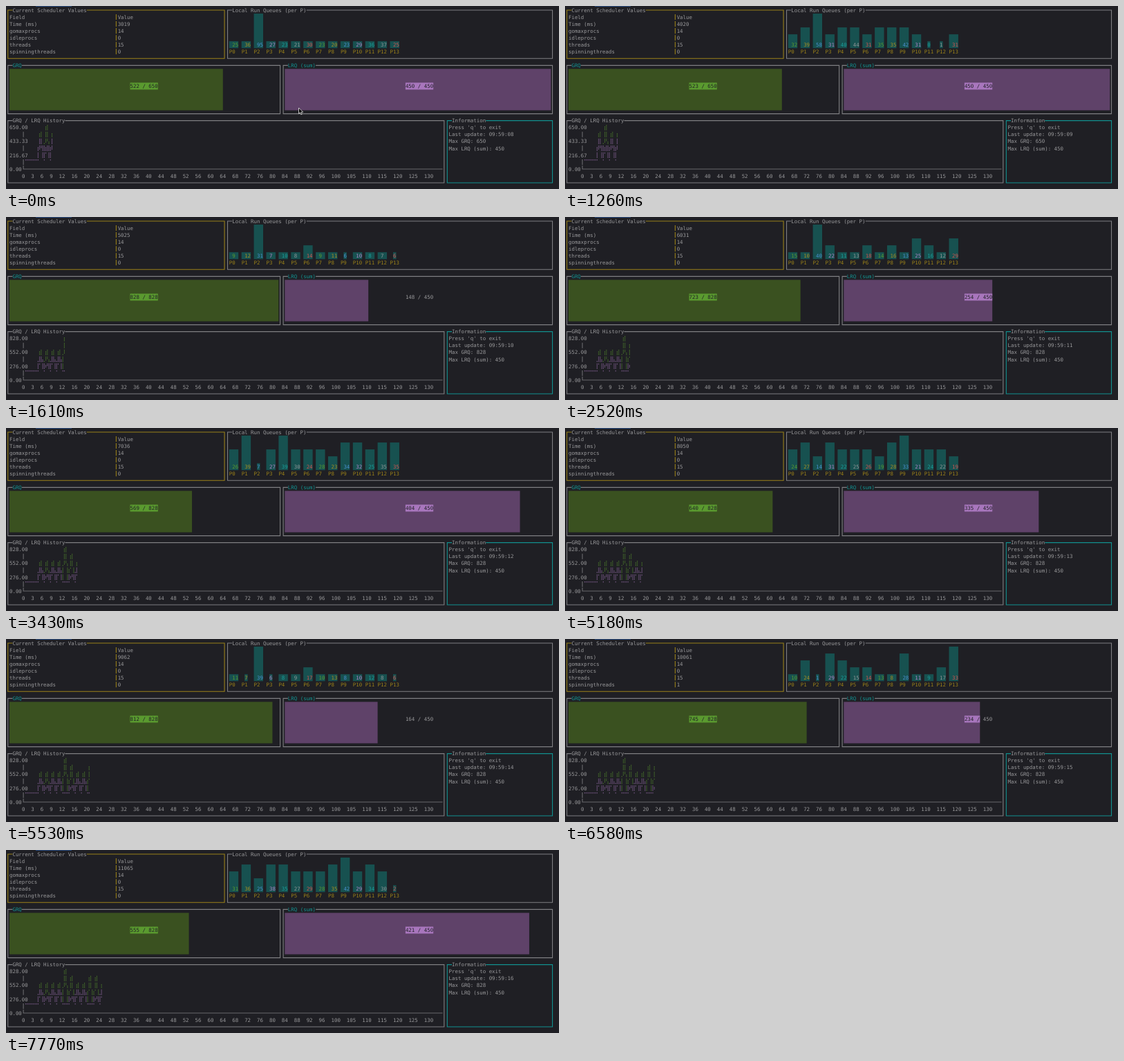
Recreate the animation shown at these times as an HTML page. Size 800 by 266 pixels, loop 8000 ms.

```html
<!DOCTYPE html>
<html lang="en">
<head>
<meta charset="utf-8">
<title>Scheduler monitor</title>
<style>
  html, body { margin: 0; width: 100%; height: 100%; overflow: hidden; background: #1f1f24; }
  svg { display: block; }
  text { font: 7.43px "DejaVu Sans Mono", monospace; white-space: pre; text-rendering: geometricPrecision; }
</style>
</head>
<body>
<svg id="screen" width="800" height="266" viewBox="0 0 800 266"></svg>
<script>
const LOOP = 8000, CW = 4.476, RH = 10.04;
const GREY = '#98989a', LINE = '#7f7f82', YELLOW = '#9a8119', CYAN = '#12918f';
const GREEN = '#5a9a2f', PURPLE = '#a876bd', TEAL = '#175150', DARK = '#1f1f24';
const CYCLE = [GREEN, '#a78f22', '#4b90cf', '#b184c8', '#1b9f9b', '#919698', '#d25450'];

// Terminal grid: left edge of a column, top and centre of a row
const colX = c => 0.5 + c * CW;
const rowY = r => 1 + r * RH;
const midY = r => rowY(r) + RH / 2;

const rect = (x, y, w, h, fill) =>
  `<rect x="${x.toFixed(2)}" y="${y.toFixed(2)}" width="${w.toFixed(2)}" height="${h.toFixed(2)}" fill="${fill}"/>`;
const cells = (c, r, w, h, fill) => rect(colX(c), rowY(r), w * CW, h * RH, fill);
const text = (c, r, s, fill = GREY) =>
  `<text x="${colX(c).toFixed(2)}" y="${(midY(r) + 2.7).toFixed(2)}" fill="${fill}">${s}</text>`;
const path = (d, stroke) => `<path d="${d}" fill="none" stroke="${stroke}" stroke-width="1.1"/>`;
const bar = (c, r, stroke) => path(`M${colX(c + 0.5)} ${rowY(r) + 1}v${RH - 2}`, stroke);

function box(c0, r0, c1, r1, title, border, titleFill = GREY) {
  const l = colX(c0 + 0.5), r = colX(c1 + 0.5), t = midY(r0), b = midY(r1);
  return path(`M${colX(c0 + 2)} ${t}H${l}V${b}H${r}V${t}H${colX(c0 + 2 + title.length)}`, border)
    + text(c0 + 2, r0, title, titleFill);
}

// Run queue lengths, one row per scheduler tick
const ticks = [
  { at: 0, ms: 3019, grq: 522, q: [25, 36, 95, 27, 23, 21, 30, 23, 20, 23, 29, 36, 37, 25] },
  { at: 350, ms: 4020, grq: 523, q: [32, 39, 58, 31, 40, 44, 31, 35, 35, 42, 31, 0, 1, 31] },
  { at: 1400, ms: 5025, grq: 828, q: [9, 12, 31, 7, 10, 8, 14, 9, 11, 6, 10, 8, 7, 6] },
  { at: 2450, ms: 6031, grq: 723, q: [15, 10, 40, 22, 11, 13, 18, 14, 16, 13, 25, 16, 12, 29] },
  { at: 3430, ms: 7036, grq: 569, q: [26, 39, 7, 27, 39, 30, 24, 28, 23, 34, 32, 25, 35, 35] },
  { at: 4480, ms: 8050, grq: 640, q: [24, 27, 14, 31, 22, 25, 26, 19, 28, 33, 21, 24, 22, 19] },
  { at: 5530, ms: 9062, grq: 812, q: [11, 7, 39, 6, 8, 9, 17, 10, 13, 8, 10, 12, 8, 6] },
  { at: 6580, ms: 10061, grq: 745, spin: 1, q: [10, 24, 1, 29, 22, 15, 14, 13, 8, 28, 11, 9, 17, 33] },
  { at: 7630, ms: 11065, grq: 555, q: [31, 36, 25, 38, 35, 27, 29, 28, 35, 42, 29, 34, 30, 2] }
];
const LRQ_MAX = 450;
const pastG = [540, 650], pastL = [430, 325];

function bars(q) {
  const max = Math.max(...q);
  return q.map((v, i) => {
    const c = 72 + 4 * i, h = Math.floor(v / max * 5), label = String(v);
    return (h ? cells(c, 6 - h, 3, h, TEAL) : cells(c + 1, 5, label.length, 1, TEAL))
      + text(c + 1, 5, label, CYCLE[i % 7]);
  }).join('');
}

function gauge(c, width, labelCol, value, max, fill, bright) {
  const filled = Math.floor(Math.floor(100 * value / max) / 100 * width);
  const label = `${value} / ${max}`;
  const n = Math.max(0, Math.min(label.length, c + filled - labelCol));
  return cells(c, 9, filled, 6, fill)
    + (n ? cells(labelCol, 11, n, 1, bright) + text(labelCol, 11, label.slice(0, n), DARK) : '')
    + (n < label.length ? text(labelCol + n, 11, label.slice(n)) : '');
}

// Braille line chart: each tick is a spike between zero samples.
// Every dot column holds one vertical run; the end point is left to the next segment.
function chart(series, max) {
  const grid = new Map();
  const plot = (x, y, colour) => {
    const c = x >> 1, r = y >> 2, key = c + ',' + r;
    if (!grid.has(key)) grid.set(key, { c, r, dots: new Set() });
    const cell = grid.get(key);
    cell.colour = colour;
    cell.dots.add((x & 1) * 4 + (y & 3));
  };
  const dotY = v => (22 - Math.floor(v / max * 5)) * 4;
  for (const [values, colour] of series) {
    const pts = [0, 0, 0, 0, ...values.flatMap(v => [0, v])];
    for (let j = 1; j < pts.length; j++) {
      const y0 = dotY(pts[j - 1]), dy = dotY(pts[j]) - y0, run = Math.abs(dy) / 2;
      for (let side = 0; side < 2; side++)
        for (let k = 0; k < Math.max(1, run); k++)
          plot((5 + j) * 2 + side, y0 + Math.sign(dy) * (side * run + k), colour);
    }
  }
  let out = '';
  for (const { c, r, dots, colour } of grid.values())
    for (const d of dots)
      out += rect(colX(c) + 0.6 + (d >> 2) * 2.2, midY(r) - 3.7 + (d & 3) * 2.1, 1.15, 1.15, colour);
  return out;
}

function frame(t, i) {
  const seen = ticks.slice(0, i + 1);
  const g = [...pastG, ...seen.map(s => s.grq)];
  const l = [...pastL, ...seen.map(s => s.q.reduce((a, b) => a + b))];
  const max = Math.max(...g);
  const table = [['Field', 'Value'], ['Time (ms)', t.ms], ['gomaxprocs', 14], ['idleprocs', 0],
    ['threads', 15], ['spinningthreads', t.spin || 0]];
  const info = ["Press 'q' to exit", 'Last update: 09:59:' + String(8 + i).padStart(2, '0'),
    'Max GRQ: ' + max, `Max LRQ (sum): ${LRQ_MAX}`];
  return table.map(([k, v], r) => text(1, r + 1, k) + text(36, r + 1, v)).join('')
    + bars(t.q)
    + gauge(1, 87, 40, t.grq, max, '#3a5120', GREEN)
    + gauge(90, 86, 129, l[l.length - 1], LRQ_MAX, '#5f4269', PURPLE)
    + [3, 2, 1].map((n, k) => text(1, 17 + 2 * k, (max * n / 3).toFixed(2))).join('')
    + chart([[g, '#4f822c'], [l, '#9069a2']], max)
    + info.map((s, r) => text(143, 17 + r, s)).join('');
}

function backdrop() {
  let s = rect(43, 0, 52, 0.8, '#2c5796')
    + box(0, 0, 70, 7, 'Current Scheduler Values', YELLOW)
    + box(71, 0, 176, 7, 'Local Run Queues (per P)', LINE)
    + box(0, 8, 88, 15, 'GRQ', LINE, CYAN)
    + box(89, 8, 176, 15, 'LRQ (sum)', LINE, CYAN)
    + box(0, 16, 141, 25, 'GRQ / LRQ History', LINE)
    + box(142, 16, 176, 25, 'Information', CYAN);
  for (let r = 1; r < 7; r++) s += bar(35, r, YELLOW);
  for (let i = 0; i < 14; i++) s += text(72 + 4 * i, 6, 'P' + i, YELLOW);
  for (const r of [18, 20, 22]) s += bar(5, r, '#6a6a6d');
  s += path(`M${colX(5.5)} ${rowY(23)}V${midY(23)}H${colX(141)}`, '#6a6a6d')
    + text(1, 23, '0.00') + text(5, 24, '0');
  for (let n = 3; n < 135; n += String(n).length + 2) s += text(5 + n, 24, n);
  return s;
}

const pointer = '<path id="pointer" d="M423.5 148v8.6l2-1.8 1.3 3 1.5-.7-1.3-2.9h2.7z" fill="#000" stroke="#eee" stroke-width=".8"/>';
const screen = document.getElementById('screen');
screen.innerHTML = backdrop() + ticks.map((t, i) => `<g class="tick">${frame(t, i)}</g>`).join('') + pointer;
const groups = screen.querySelectorAll('.tick');
const arrow = document.getElementById('pointer');

function draw(now) {
  const time = now % LOOP;
  const current = ticks.filter(t => t.at <= time).length - 1;
  groups.forEach((g, i) => g.style.display = i === current ? '' : 'none');
  arrow.style.display = current === 0 ? '' : 'none';
}
function loop() {
  draw(performance.now());
  requestAnimationFrame(loop);
}
loop();
</script>
</body>
</html>
```
